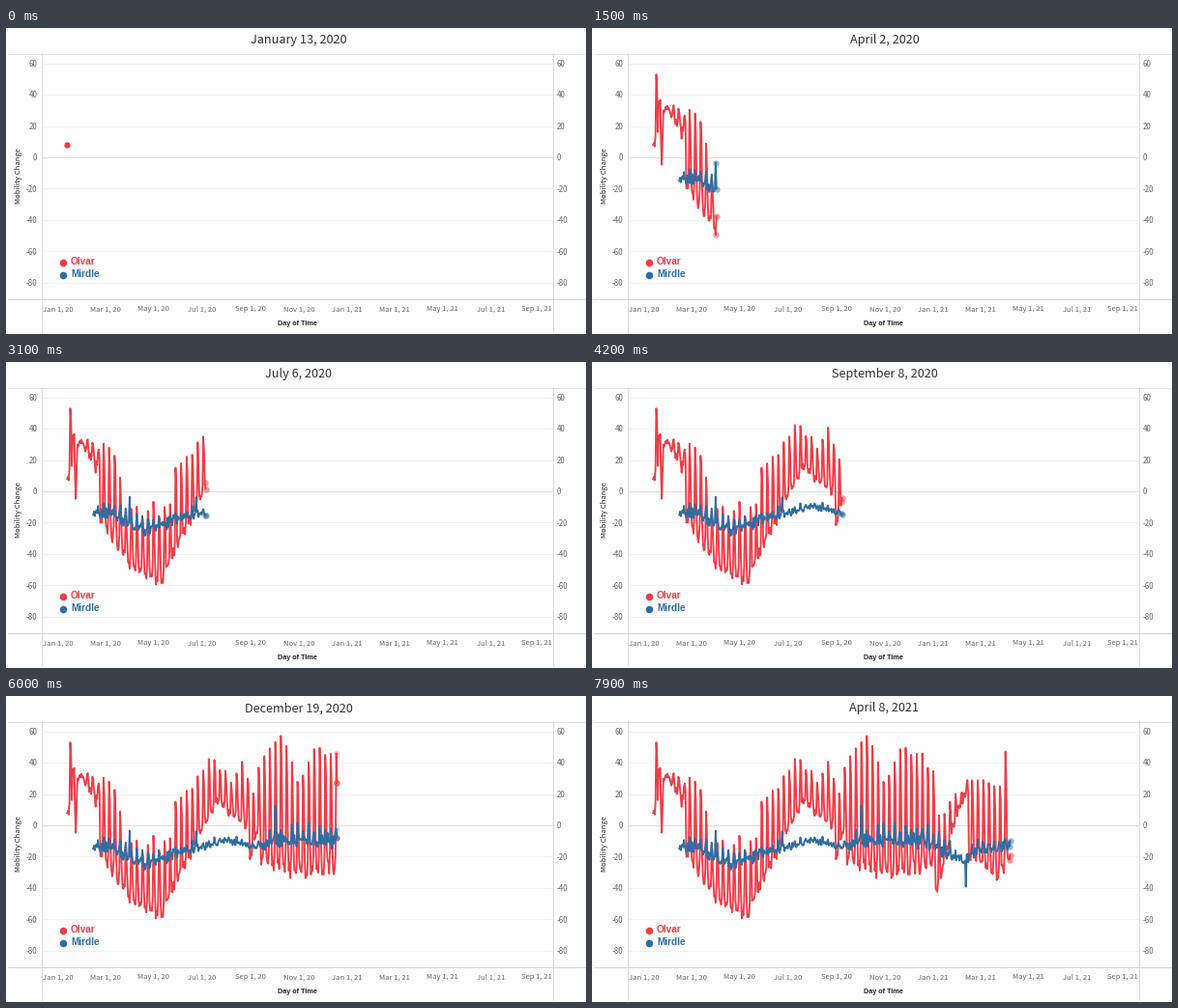
Animation of 600 by 317 pixels, one loop 8 s. Source, as a matplotlib script:

```python
import numpy as np
import matplotlib.pyplot as plt
from matplotlib.animation import FuncAnimation

W, H, DPI = 600, 317, 100
FRAMES, INTERVAL = 80, 100
RED, BLUE = "#ee3d46", "#2f6da3"
GREY, DARK = "#666666", "#222222"
START = np.datetime64("2020-01-13")
DAYS = np.arange(455)
BLUE_START = 33
MONTHS = ("January February March April May June July August "
          "September October November December").split()

plt.rcParams["font.family"] = ["Noto Sans CJK JP"]


def day_x(day):
    return 63.2 + 0.819 * np.asarray(day, float)


def val_y(value):
    return 134 - 1.621 * np.asarray(value, float)


def keyed(t, *points):
    return np.interp(t, *zip(*points))


def bump(centre, width, height):
    return height * np.exp(-((DAYS - centre) / width) ** 2)


def red_series():
    """Weekly cycle between a low and a peak on Friday and Saturday."""
    rng = np.random.default_rng(3)
    week = DAYS // 7
    peak = keyed(week, (0, 53), (2, 31), (8, 26), (10, -13), (18, -11),
                 (19, 16), (23, 28), (26, 43), (29, 26), (31, 41), (33, 23),
                 (35, 44), (38, 56), (41, 29), (44, 51), (48, 43), (50, 30),
                 (51, 4), (56, 28), (62, 27), (63, 48), (64, -15))
    low = keyed(week, (0, 7), (1, 36), (5, 17), (6, -20), (11, -46),
                (14, -55), (17, -57), (20, -35), (24, -5), (27, 14),
                (32, 0), (33, -19), (34, -5), (35, -25), (43, -33),
                (50, -27), (51, -43), (54, 0), (56, 19), (57, -22),
                (62, -34), (64, -22))
    shape = np.array([0.02, 0.05, 0, 0.15, 1, 0.8, 0.2])[DAYS % 7]
    noise = rng.normal(0, 2, len(DAYS)) * (DAYS > 6)
    return low + (peak - low) * shape + noise + bump(11, 1.4, -46)


def blue_series():
    """Slow trend with a weekly swing that is strongest in winter."""
    rng = np.random.default_rng(7)
    trend = keyed(DAYS, (33, -13), (60, -14), (85, -22), (105, -23),
                  (130, -18), (200, -10), (220, -10), (233, -14),
                  (262, -9), (345, -9), (390, -22), (410, -15), (451, -12))
    swing = keyed(DAYS, (33, 4), (100, 5), (170, 2.5), (245, 2.5),
                  (263, 6), (345, 6), (390, 3), (450, 5))
    shape = np.array([-0.3, 0, -0.2, 0.1, 1, -0.1, -0.5])[DAYS % 7]
    noise = np.clip(rng.normal(0, 0.5, len(DAYS)), -1.2, 1)
    events = (bump(79, 0.6, 14) + bump(163, 0.6, 13)
              + bump(263, 0.6, 15) + bump(395, 0.7, -19))
    return trend + swing * (shape + noise) + events


fig = plt.figure(figsize=(W / DPI, H / DPI), dpi=DPI, facecolor="#fefefe")
ax = fig.add_axes([0, 0, 1, 1])
ax.set_xlim(0, W)
ax.set_ylim(H, 0)
ax.axis("off")


def rule(xs, ys, color):
    ax.plot(xs, ys, color=color, lw=0.72, zorder=1)


def label(x, y, s, px, color=GREY, ha="center", **kw):
    """Text whose capitals are centred on y."""
    return ax.text(x, y + 0.365 * px, s, fontsize=px * 72 / DPI, color=color,
                   ha=ha, va="baseline", **kw)


def dot(color, x=0, y=0, size=6.4):
    return ax.plot([x], [y], "o", color=color, ms=size * 72 / DPI,
                   mew=0, zorder=5, snap=False)[0]


# Grid, frame and axes
for v in range(-80, 61, 20):
    y = float(val_y(v))
    rule([37, 565], [y, y], "#dedede" if v == 0 else "#f1f1f1")
    label(32.5, y + 0.4, str(v), 8, ha="right")
    label(570, y + 0.4, str(v), 8, ha="left")
for y, color in ((26.5, "#e2e2e2"), (280.5, "#d6d6d6"), (316.5, "#c8c8c8")):
    rule([2, W], [y, y], color)
for x in (37, 566):
    rule([x, x], [26, 315], "#dcdcdc")

for month in np.arange("2020-01", "2021-10", 2, dtype="datetime64[M]"):
    year, number = str(month).split("-")
    x = day_x((month.astype("datetime64[D]") - START).astype(int))
    label(min(float(x), 549), 290.7, f"{MONTHS[int(number) - 1][:3]} 1, {year[2:]}", 7.6)
label(301, 305.4, "Day of Time", 7.3, DARK, family="Liberation Sans", weight="bold")
ax.text(13, 153, "Mobility Change", fontsize=7.6 * 72 / DPI, color=DARK,
        rotation=90, ha="center", va="center")

# Legend
for y, name, color in ((242.8, "Olvar", RED), (255.6, "Mirdle", BLUE)):
    dot(color, 58.5, y, 7.6)
    label(67, y - 1.4, name, 10, color, ha="left",
          family="Liberation Sans", weight="bold")

title = label(302.5, 11.8, "", 12.7, "#333333")


class Trace:
    """A growing line whose head marker fades from one day to the next."""

    def __init__(self, values, first, color, z):
        self.first = first
        self.x, self.y = day_x(DAYS), val_y(values)
        self.line, = ax.plot([], [], color=color, lw=1.35, zorder=z,
                             solid_joinstyle="round")
        self.old, self.new = dot(color), dot(color)

    def show(self, day, mix):
        span = slice(self.first, day + 1)
        self.line.set_data(self.x[span], self.y[span])
        for mark, d, alpha in ((self.old, day - 1, 1 - mix), (self.new, day, mix)):
            mark.set_visible(d >= self.first)
            mark.set_data([self.x[d]], [self.y[d]])
            mark.set_alpha(alpha)


traces = [Trace(red_series(), 0, RED, 3),
          Trace(blue_series(), BLUE_START, BLUE, 4)]


def update(frame):
    pos = keyed(frame, (0, 0), (15, 79.5), (31, 174.5), (42, 238.5),
                (51, 290), (69, 391.5), (79, 450.5))
    day = int(np.ceil(pos - 1e-6))
    mix = float(min(1, pos - day + 1))
    year, month, dom = str(START + day).split("-")
    title.set_text(f"{MONTHS[int(month) - 1]} {int(dom)}, {year}")
    for trace in traces:
        trace.show(day, mix)
    return [title]


anim = FuncAnimation(fig, update, frames=FRAMES, interval=INTERVAL,
                     init_func=lambda: update(0), repeat=True,
                     repeat_delay=0, blit=False)
plt.show()
```
